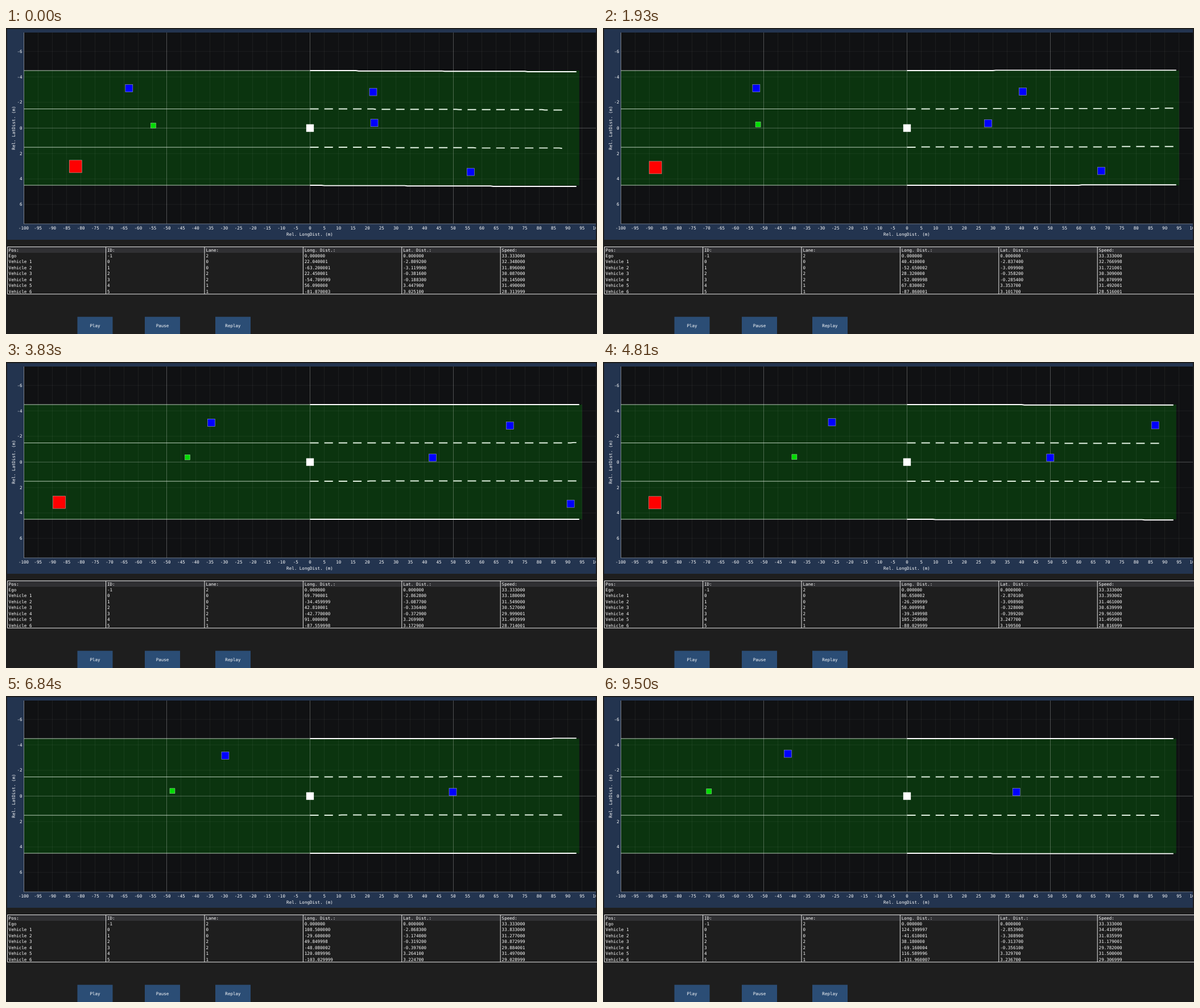
Animation of 1039 by 539 pixels, one loop 9.57 s. Source, as an HTML page:

```html
<!DOCTYPE html>
<html lang="en">
<head>
<meta charset="utf-8">
<title>Relative traffic view</title>
<style>
  html, body { margin: 0; width: 100%; height: 100%; overflow: hidden; background: #1e1e1e; }
  svg { display: block; }
  text {
    font: 7.55px "DejaVu Sans Mono", monospace;
    fill: #fff;
    dominant-baseline: central;
    text-rendering: geometricPrecision;
    white-space: pre;
  }
</style>
</head>
<body>
<svg id="stage" width="1039" height="539" viewBox="0 0 1039 539">
  <clipPath id="plotClip"><rect x="31" y="8" width="1006" height="337"/></clipPath>
  <clipPath id="panelClip"><rect x="2" y="2" width="1035" height="371"/></clipPath>
</svg>
<script>
const LOOP = 9570;
const END = 9500;
const UNIT = 1039 / 1600; // one pixel row of the plotted view

// Key points: distance ahead at DRIVE_TIMES, sideways at start, middle and end, speed at both ends
const DRIVE_TIMES = [0, 1090, 2840, 4810, 5930, 7820, END];
const LATERAL_TIMES = [0, 4810, END];
const SPEED_TIMES = [0, END];

const car = { size: 13, color: '#00f' };
const bike = { size: 9, color: '#00dc00' };
const truck = { size: 22, color: '#f00' };
const vehicles = [
  { kind: car, lane: 0, long: [22.04, 30.96, 52.86, 86.65, 101.97, 113.22, 124.2],
    lat: [-2.8092, -2.8701, -2.8539], speed: [32.348, 34.411] },
  { kind: car, lane: 0, long: [-63.2, -58.41, -45.06, -26.21, -25.27, -35.79, -41.61],
    lat: [-3.1199, -3.0989, -3.3089], speed: [31.896, 31.036] },
  { kind: car, lane: 2, long: [22.45, 24.22, 34.41, 50.01, 52.99, 44.39, 38.18],
    lat: [-0.3816, -0.328, -0.3137], speed: [30.087, 31.179] },
  { kind: bike, lane: 2, long: [-54.71, -54.58, -48.03, -39.35, -41.37, -57.1, -69.16],
    lat: [-0.1883, -0.3992, -0.3561], speed: [30.145, 29.782] },
  { kind: car, lane: 1, long: [56.09, 61.55, 76.89, 105.25, 117.21, 119.45, 116.59],
    lat: [3.4479, 3.2477, 3.3297], speed: [31.49, 31.5] },
  { kind: truck, lane: 1, long: [-81.87, -86.38, -88.32, -88.03, -93.37, -115.2, -131.96],
    lat: [3.0251, 3.1995, 3.2367], speed: [28.314, 29.307] }
];

const px = m => 534.5 + m * 5.035;
const py = m => 176.08 + m * 22.47;
const snap = y => (Math.floor(y / UNIT) + 0.5) * UNIT;
const stage = document.getElementById('stage');

function set(el, attrs) {
  for (const name in attrs) el.setAttribute(name, attrs[name]);
}
function add(parent, tag, attrs) {
  const el = document.createElementNS('http://www.w3.org/2000/svg', tag);
  set(el, attrs);
  parent.appendChild(el);
  return el;
}
const rect = (parent, x, y, width, height, fill) => add(parent, 'rect', { x, y, width, height, fill });
const path = (parent, d, stroke, width = 1, opacity = 1) =>
  add(parent, 'path', { d, stroke, 'stroke-width': width, 'stroke-opacity': opacity, fill: 'none' });
function label(parent, x, y, content, anchor = 'start') {
  const el = add(parent, 'text', { x, y, 'text-anchor': anchor });
  el.textContent = content;
  return el;
}
function marker(parent, size, fill) {
  const el = rect(parent, 0, 0, size, size, fill);
  set(el, { stroke: '#fff', 'stroke-width': UNIT, 'stroke-opacity': 0.55 });
  return el;
}
const place = (el, size, long, lat) => set(el, { x: px(long) - size / 2, y: snap(py(lat)) - size / 2 });

// Plot panel
const panel = add(stage, 'g', { 'clip-path': 'url(#panelClip)' });
rect(panel, 2, 2, 1035, 371, '#23344f');
rect(panel, 31, 8, 1006, 337, '#101113');
const plot = add(panel, 'g', { 'clip-path': 'url(#plotClip)' });
const road = rect(plot, 31, py(-4.5), 976, py(4.5) - py(-4.5), '#0b340f');

for (let m = -100; m <= 100; m += 5) {
  const x = Math.floor(px(m)) + 0.5;
  path(plot, `M${x} 8V345`, '#fff', 1, m % 50 ? 0.055 : 0.27);
  label(panel, px(m), 352, m, 'middle');
}
for (let m = -6; m <= 6; m += 2) {
  const y = snap(py(m));
  path(plot, `M31 ${y}H1037`, '#fff', 1, m ? 0.055 : 0.27);
  label(panel, 28.5, y, m, 'end');
}
path(panel, 'M31.5 8V345M31 345H1037', '#8f98a6', 1, 0.7);
label(panel, 534, 363, 'Rel. LongDist. (m)', 'middle');
set(label(panel, 0, 0, 'Rel. LatDist. (m)', 'middle'), { transform: 'translate(13 176) rotate(-90)' });

const laneMarks = [-4.5, -1.5, 1.5, 4.5].map(lat => {
  path(plot, `M31 ${snap(py(lat))}H534.5`, '#e4f4e4', 0.8);
  const solid = Math.abs(lat) > 2;
  return { lat, solid, el: path(plot, '', solid ? '#fff' : '#e2f2e2', 3 * UNIT) };
});

place(marker(plot, 13, '#fff'), 13, 0, 0);
for (const v of vehicles) v.box = marker(plot, v.kind.size, v.kind.color);

// Table
const columnX = i => 2.2 + i * 173.4;
const rowY = row => 391 + row * 10.47;
rect(stage, 2, 385, 1037, 11, '#303033');
let tableLines = 'M1039 385.5H2.5V468.7H1039';
for (let i = 1; i < 6; i++) tableLines += `M${columnX(i)} 385V469`;
path(stage, tableLines, '#e6e6e6');
const addRow = (row, cells) => cells.map((cell, i) => label(stage, columnX(i) + 2.4, rowY(row), cell));

addRow(0, ['Pos:', 'ID:', 'Lane:', 'Long. Dist.:', 'Lat. Dist.:', 'Speed:']);
addRow(1, ['Ego', -1, 2, '0.000000', '0.000000', '33.333000']);
vehicles.forEach((v, i) => {
  v.cells = addRow(i + 2, [`Vehicle ${i + 1}`, i, v.lane, '', '', '']).slice(3);
});

[['Play', 125.5], ['Pause', 244], ['Replay', 368]].forEach(([name, x]) => {
  rect(stage, x, 508.7, 62, 30.3, '#2b4d75');
  label(stage, x + 31, 524, name, 'middle');
});

// Smooth curve through the key points
function curve(values, times, t) {
  const last = times.length - 1;
  let i = 0;
  while (i < last - 1 && t >= times[i + 1]) i++;
  const rate = k => (values[k + 1] - values[k]) / (times[k + 1] - times[k]);
  const tangent = k => {
    if (k === 0) return rate(0);
    if (k === last) return rate(k - 1);
    const before = times[k] - times[k - 1], after = times[k + 1] - times[k];
    return (rate(k - 1) * after + rate(k) * before) / (before + after);
  };
  const span = times[i + 1] - times[i];
  const u = (t - times[i]) / span, w = 1 - u;
  return values[i] * w * w * (1 + 2 * u) + values[i + 1] * u * u * (3 - 2 * u)
    + span * u * w * (tangent(i) * w - tangent(i + 1) * u);
}

// Readings are single-precision numbers
const reading = (value, digits) => Math.fround(value.toFixed(digits)).toFixed(6);

function drawLanes(t) {
  const seconds = t / 1000;
  const length = seconds > 1.05 && seconds < 4 ? 94 : 93;
  const bend = 2.1 * Math.exp(-seconds / 6) * Math.cos(seconds * Math.PI / 2.5 - 0.25);
  const stretch = (from, to) => {
    const points = [];
    for (let m = from; m <= to; m++) points.push(`${px(m)} ${snap(py(lat) + bend * m / 93)}`);
    return 'M' + points.join('L');
  };
  let lat;
  road.setAttribute('width', px(length + 1) - 31);
  for (const mark of laneMarks) {
    lat = mark.lat;
    let d = '';
    if (mark.solid) d = stretch(0, length);
    else for (let m = 0; m + 3 < length; m += 5) d += stretch(m, m + 3);
    mark.el.setAttribute('d', d);
  }
}

function draw(t) {
  drawLanes(t);
  for (const v of vehicles) {
    const long = curve(v.long, DRIVE_TIMES, t);
    const lat = curve(v.lat, LATERAL_TIMES, t);
    place(v.box, v.kind.size, long, lat);
    v.cells[0].textContent = reading(long, 2);
    v.cells[1].textContent = reading(lat, 4);
    v.cells[2].textContent = reading(curve(v.speed, SPEED_TIMES, t), 3);
  }
}

// The picture advances in 70 ms steps, with two slightly longer holds
function stepTime(t) {
  const delay = t >= 3500 ? 50 : t >= 500 ? 40 : 0;
  return delay + 70 * Math.floor((t - delay) / 70);
}

const start = performance.now();
function tick() {
  draw(stepTime((performance.now() - start) % LOOP));
  requestAnimationFrame(tick);
}
tick();
</script>
</body>
</html>
```
